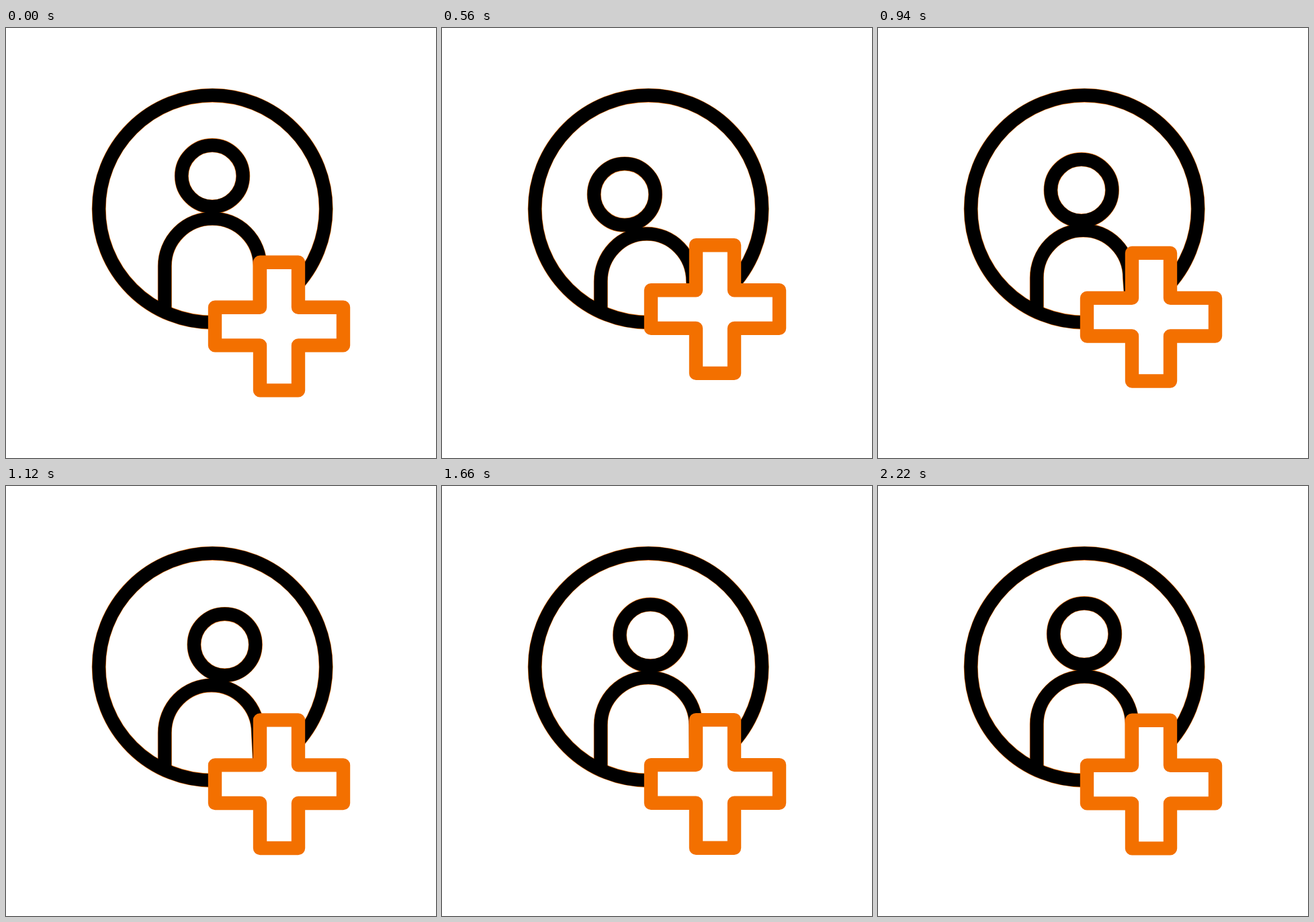
Animation of 640 by 640 pixels, one loop 2.4 s. Source, as an HTML page with a canvas:

```html
<!DOCTYPE html>
<html lang="en">
<head>
<meta charset="utf-8">
<title>Add user</title>
<style>
  html, body { margin: 0; width: 100%; height: 100%; overflow: hidden; background: #fff; }
  canvas { display: block; width: 640px; height: 640px; }
</style>
</head>
<body>
<canvas id="stage" width="640" height="640"></canvas>
<script>
const ctx = document.getElementById('stage').getContext('2d');
const LOOP = 2400, ORANGE = '#f37000', LINE = 20.4;

// Smooth step from 0 to 1 between two times
function ease(t, from, to) {
  const u = Math.min(1, Math.max(0, (t - from) / (to - from)));
  return u * u * (3 - 2 * u);
}

// Rises to 1, optionally holds, then returns to 0
function pulse(t, start, peak, end, leave = peak) {
  return ease(t, start, peak) - ease(t, leave, end);
}

function stroke(path, color, width) {
  ctx.strokeStyle = color;
  ctx.lineWidth = width;
  ctx.stroke(path);
}

function ring(x, y, r) {
  const path = new Path2D();
  path.arc(x, y, r, 0, 2 * Math.PI);
  return path;
}

// Shoulders sink by `drop` and narrow slightly on the right
function torso(drop) {
  const left = 236.3, right = 378 - 0.2 * drop, y = 354.3 + drop;
  const path = new Path2D();
  path.moveTo(left, 419);
  path.lineTo(left, y);
  path.ellipse((left + right) / 2, y, (right - left) / 2, 70.7, 0, Math.PI, 2 * Math.PI);
  path.lineTo(378, 420);
  return path;
}

const plus = new Path2D('M378 348.8h57v67h67v56.6h-67v67h-57v-67h-67v-56.6h67z');
const frame = ring(307.2, 269.2, 169);

function draw(t) {
  // The head leans left, then right, then settles
  const left = pulse(t, 200, 605, 1268), right = pulse(t, 605, 1268, 1770);
  const lean = 26.5 * right - 36.3 * left;
  const sink = 28.3 * left + 14 * right;
  const lift = 25.5 * (pulse(t, 200, 540, 1100, 800) + pulse(t, 1100, 1370, 1632) + pulse(t, 1632, 1920, 2210));
  const person = [frame, torso(0.83 * sink), ring(307 + lean, 220.3 + sink, 45.7)];

  ctx.fillStyle = '#fff';
  ctx.fillRect(0, 0, 640, 640);
  ctx.lineJoin = 'round';
  // A hairline of orange shows around the black strokes
  for (const path of person) stroke(path, ORANGE, LINE + 0.6);
  for (const path of person) stroke(path, '#000', LINE - 0.6);

  ctx.save();
  ctx.translate(0, -lift);
  ctx.fill(plus);
  stroke(plus, ORANGE, LINE);
  ctx.restore();
}

const start = performance.now();
function tick() {
  draw((performance.now() - start) % LOOP);
  requestAnimationFrame(tick);
}
tick();
</script>
</body>
</html>
```
